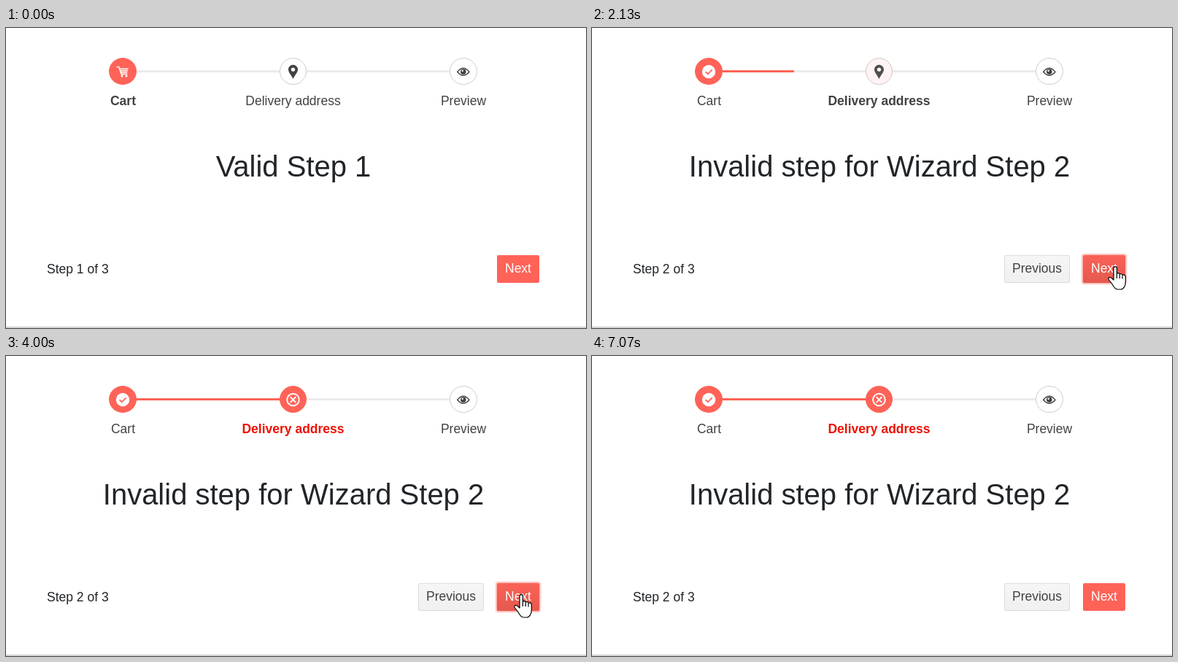
Write an HTML page that moves like this. It is 795 px wide and 412 px high and loops after 7150 ms.

```html
<!DOCTYPE html>
<html lang="en">
<head>
<meta charset="utf-8">
<title>Wizard steps</title>
<style>
html, body { margin: 0; width: 100%; height: 100%; overflow: hidden; background: #fff; }
svg { display: block; width: 100%; height: 100%; }
text { font: 17.5px "Liberation Sans", Arial, sans-serif; fill: #424242; text-anchor: middle; }
#title { font-size: 40px; fill: #212529; }
#count { text-anchor: start; fill: #212529; }
.bold { font-weight: bold; }
</style>
</head>
<body>
<svg viewBox="0 0 795 412">
  <defs>
    <linearGradient id="redFade" x2="0" y2="1">
      <stop stop-color="#fa6257"/><stop offset="1" stop-color="#e5594f"/>
    </linearGradient>
    <linearGradient id="greyFade" x2="0" y2="1">
      <stop stop-color="#f6f6f6"/><stop offset="1" stop-color="#f0f0f0"/>
    </linearGradient>
  </defs>
  <rect width="795" height="412" fill="#fff"/>
  <rect y="410.2" width="795" height="1.5" fill="#c8c8c8"/>

  <rect x="160" y="58" width="467" height="3" fill="#ebebeb"/>
  <rect id="bar" x="160" y="58" height="3" fill="#ff6358"/>

  <ellipse cx="160" cy="59.5" rx="19" ry="18.5" fill="#ff6358"/>
  <g id="cart" fill="none" stroke="#fff" stroke-width="1.5">
    <path d="M151.5 53.5h3.3l3.2 9.7h8.3M156 56h11.7M156.8 58.4h10.2M157.6 60.8h8.7"/>
    <g fill="#fff" stroke="none"><circle cx="159" cy="65.8" r="1.6"/><circle cx="165" cy="65.8" r="1.6"/></g>
  </g>
  <g id="check">
    <circle cx="160" cy="60" r="9.2" fill="#fff"/>
    <path d="M155.6 60.2l3.1 3.1 5.9-6" fill="none" stroke="#ff6358" stroke-width="1.8"/>
  </g>

  <circle id="spot" cx="393.5" cy="59.5" r="18"/>
  <path id="pin" fill-rule="evenodd" d="M393.5 50.5a6.5 6.5 0 0 1 6.5 6.5c0 4-4 7.500-6.500 13c-2.500-5.500-6.500-9-6.500-13a6.500 6.500 0 0 1 6.500-6.500zm0 3.900a2.700 2.700 0 1 0 0 5.400a2.700 2.700 0 1 0 0-5.400z"/>
  <g id="cross" fill="none" stroke="#fff" stroke-width="1.9">
    <circle cx="393.500" cy="60" r="8.300"/><path d="M389.700 56.200l7.600 7.600m0-7.600l-7.600 7.600"/>
  </g>

  <ellipse cx="627" cy="59.5" rx="18.5" ry="18" fill="#fff" stroke="#ccc"/>
  <path d="M618.700 60.200q8-9.800 16.200 0q-8.200 9.600-16.200 0z" fill="none" stroke="#424242" stroke-width="1.500"/>
  <circle cx="626.800" cy="60" r="3.800" fill="#424242"/>
  <circle cx="625.700" cy="58.700" r="1.200" fill="#fff"/>

  <text id="label1" x="160.500" y="106">Cart</text>
  <text id="label2" x="393.500" y="106">Delivery address</text>
  <text x="627" y="106">Preview</text>
  <text id="title" x="394" y="204"></text>
  <text id="count" x="56" y="337"></text>

  <g id="prev">
    <g id="prevGlow"></g>
    <rect id="prevBox" x="565.500" y="312.500" width="89" height="37" rx="1.500"/>
    <text x="610" y="336">Previous</text>
  </g>
  <g id="nextGlow"></g>
  <rect id="nextBox" x="673" y="312" width="58" height="38" rx="2"/>
  <text x="702" y="336" style="fill:#fff">Next</text>

  <g id="cursor" fill="#fff" stroke="#000" stroke-width="1.200" stroke-linejoin="round">
    <path id="arrow" d="M.5.5V17l4-3.800 2.600 6 2.400-1-2.600-5.900h5.300z"/>
    <g id="hand">
      <path d="M8 2.800a2.200 2.200 0 0 1 4.400 0V10.500c.8-1.400 3.600-1 3.900.7 1-1 3.400-.6 3.700 1 1.200-.8 4.300-.2 4.300 2.200V22c0 5-2.600 10-7 10h-3.500c-3.800 0-5.600-3-7.600-7L1.200 18.500c-1.200-2.200 1.300-4.200 3.300-2.600L8 19z"/>
      <path d="M12.400 10.500V17M16.300 11.500V17M20 12.500V17.500" fill="none"/>
    </g>
  </g>
  <circle id="press" r="18" fill="#ffd700" opacity=".6"/>
</svg>
<script>
const LOOP = 7150, TICK = 68, CLICK = 1790;
const $ = id => document.getElementById(id);
const set = (id, attrs) => { for (const k in attrs) $(id).setAttribute(k, attrs[k]); };
const show = (id, on) => set(id, { visibility: on ? "visible" : "hidden" });
const within = (t, a, b) => t >= a && t < b;
const clamp = v => Math.max(0, Math.min(1, v));
const smooth = v => v * v * (3 - 2 * v);
const mix = (a, b, k) => `rgb(${a.map((v, i) => Math.round(v + (b[i] - v) * k))})`;

const CORAL = [255, 99, 88], WHITE = [255, 255, 255], DARK = [66, 66, 66], GREY = [204, 204, 204];

// time, left, top, 1 for the arrow shape
const moves = [
  [1040, 666, 272, 1], [1120, 669, 290, 1], [1190, 672, 318], [1260, 684, 336],
  [1330, 695, 343], [1400, 703, 336], [1520, 707, 322],
  [2062, 707, 325], [2130, 707, 327], [2198, 705, 331], [2266, 703, 334], [2480, 702, 336],
  [2810, 700, 336], [3070, 699, 334], [3130, 698, 332], [3200, 697, 330], [3270, 696, 328],
  [4000, 696, 327],
  [5330, 688, 327], [5400, 660, 331, 1], [5470, 628, 333], [5530, 610, 334], [5600, 606, 334],
  [6530, 657, 392, 1]
];
const presses = [CLICK, 3400, 4930, 5930];

function addGlow(id, x, width, color, weights) {
  $(id).innerHTML = weights.map((o, i) => {
    const d = i + 1;
    return `<rect x="${x - d}" y="${312 - d}" width="${width + 2 * d}" height="${38 + 2 * d}" rx="${2 + d}" fill="${color}" opacity="${o}"/>`;
  }).join("");
}
addGlow("nextGlow", 673, 58, "#ff6358", [.25, .2, .12]);
addGlow("prevGlow", 565, 90, "#000", [.06, .05]);

function draw(t) {
  const second = t >= CLICK + 70, error = t >= 3470;
  const step = CLICK + Math.floor((t - CLICK) / TICK) * TICK;
  const pressed = presses.some(p => within(t, p, p + 70));

  // Stepper
  const fill = smooth(clamp((step - 1930) / 400));
  const tint = smooth(clamp((step - 2090) / 244));
  set("bar", { width: 233.5 * fill });
  show("cart", !second);
  show("check", second);
  set("spot", { fill: mix(WHITE, CORAL, tint), stroke: mix(GREY, CORAL, tint) });
  set("pin", { fill: mix(DARK, WHITE, tint) });
  show("pin", !error);
  show("cross", error);
  set("label1", { class: second ? "" : "bold" });
  set("label2", { class: second ? "bold" : "" });
  $("label2").style.fill = error ? "#ee1100" : "";
  $("title").textContent = second ? "Invalid step for Wizard Step 2" : "Valid Step 1";
  $("count").textContent = `Step ${second ? 2 : 1} of 3`;

  // Buttons
  const overNext = within(t, 1190, 5400), focusNext = within(t, CLICK, 5930);
  const overPrev = within(t, 5470, 6530);
  set("nextBox", {
    fill: !overNext ? "#ff6358" : pressed ? "#dc554c" : focusNext ? "url(#redFade)" : "#f05f55"
  });
  show("nextGlow", focusNext);
  set("prev", { display: second ? "inline" : "none" });
  set("prevBox", {
    fill: !overPrev ? "url(#greyFade)" : pressed ? "#dadada" : "#e9e9e9",
    stroke: overPrev ? "#d0d0d0" : "#dcdcdc"
  });
  show("prevGlow", within(t, 5930, 7070));

  // Pointer
  const visible = within(t, 1040, 6600);
  const [, x, y, isArrow] = moves.filter(m => m[0] <= t).pop() || moves[0];
  set("cursor", { transform: `translate(${x} ${y})` });
  show("arrow", visible && isArrow);
  show("hand", visible && !isArrow);
  set("press", { cx: x + 10, cy: y + 1 });
  show("press", pressed);
}

const start = performance.now();
function loop() {
  draw((performance.now() - start) % LOOP);
  requestAnimationFrame(loop);
}
loop();
</script>
</body>
</html>
```
